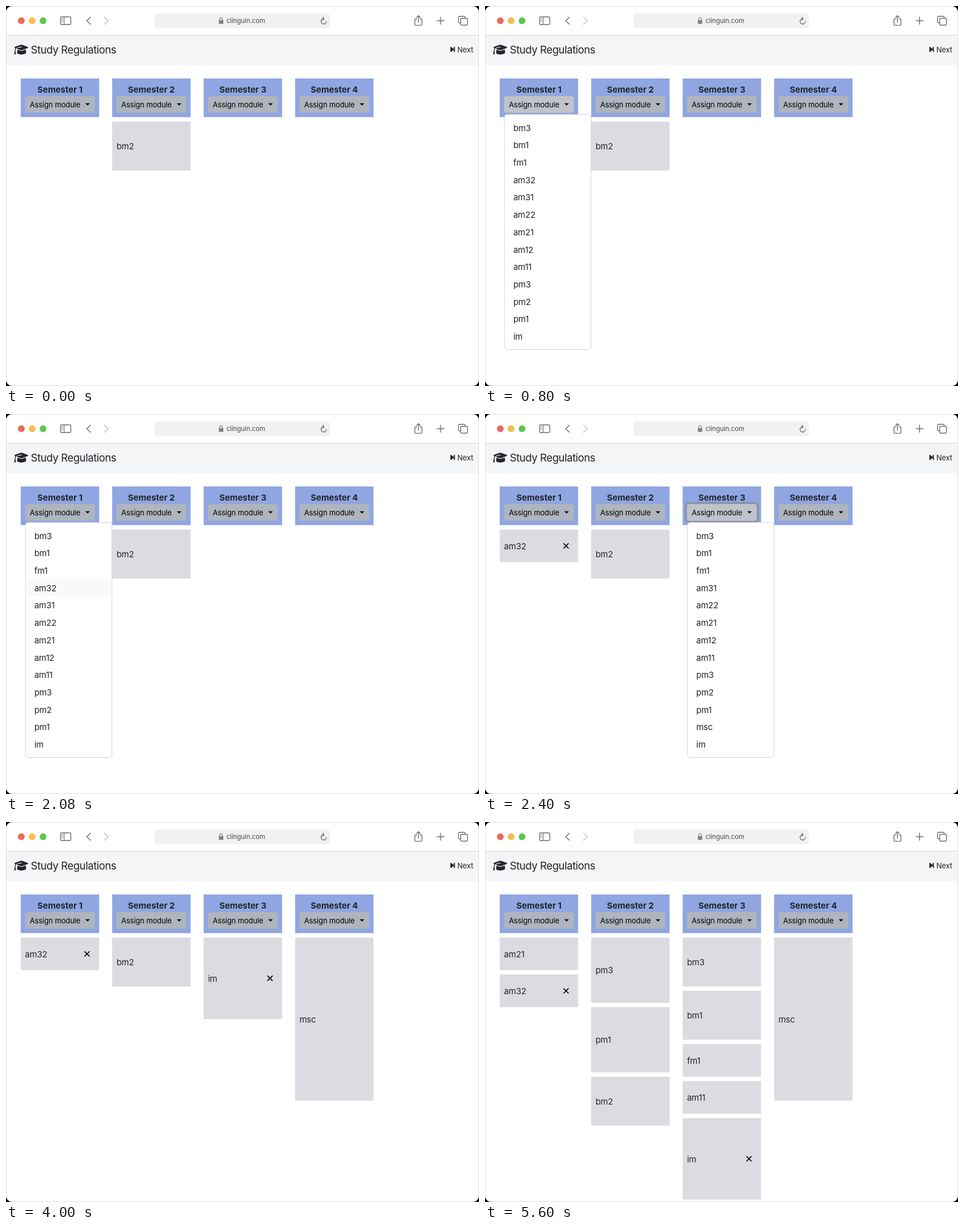
Recreate the animation shown at these times as an HTML page. Size 834 by 671 pixels, loop 6.4 s.

```html
<!DOCTYPE html>
<html lang="en">
<head>
<meta charset="utf-8">
<title>Study Regulations</title>
<style>
html, body { margin: 0; width: 100%; height: 100%; overflow: hidden; background: #000; }
svg { display: block; width: 834px; height: 671px; }
text { font: 14.9px Inter, "Liberation Sans", sans-serif; letter-spacing: -.01em; fill: #212529; white-space: pre; }
.brand { font-size: 18.6px; letter-spacing: -.025em; }
.head { font-weight: 700; text-anchor: middle; letter-spacing: 0; }
.small { font-size: 13px; fill: #000; }
.url { font-size: 11.6px; letter-spacing: -.01em; fill: #4a4a4a; }
.line { fill: none; stroke: #6b6b6b; stroke-width: 1.4; stroke-linecap: round; stroke-linejoin: round; }
</style>
</head>
<body>
<svg viewBox="0 0 834 671">
  <rect x=".5" y=".5" width="833" height="670" rx="10" fill="#fff" stroke="#dcdcdc"/>
  <circle cx="27" cy="26" r="6" fill="#ec6a5e"/>
  <circle cx="46" cy="26" r="6" fill="#f4be4f"/>
  <circle cx="65.3" cy="26" r="6" fill="#61c354"/>
  <g class="line">
    <rect x="96.2" y="19.2" width="18" height="13.6" rx="2"/>
    <path d="M102.5 19.5v13M98.3 22.3h2M98.3 24.8h2M98.3 27.3h2" stroke-width="1.1"/>
    <path d="M149 19.8L142.3 26l6.7 6.3"/>
    <path d="M173.7 19.8l6.7 6.2-6.7 6.3" stroke="#bdbdbd"/>
    <path d="M724.3 22.7h-1.6q-1.7 0-1.7 1.7v8q0 1.7 1.7 1.7h9q1.7 0 1.7-1.7v-8q0-1.7-1.7-1.7h-1.6M727.2 28.8V17.2M724 20.2l3.2-3.2 3.2 3.2"/>
    <path d="M760 26h12.4M766.2 19.8v12.4"/>
    <path d="M801.5 29.8h-1.6q-1.9 0-1.9-1.9v-7.8q0-1.9 1.9-1.9h7.8q1.9 0 1.9 1.9v1.5"/>
    <rect x="801.7" y="21.7" width="12" height="12" rx="2"/>
  </g>
  <rect x="262" y="13" width="309.5" height="26.3" rx="6" fill="#f1f1f1"/>
  <rect x="375.2" y="25" width="8" height="6.6" rx="1" fill="#808080"/>
  <path d="M376.8 25.5v-2q0-2.6 2.4-2.6t2.4 2.6v2" fill="none" stroke="#808080" stroke-width="1.2"/>
  <path class="line" d="M560.2 22.4a4.7 4.7 0 1 0 4.7 4.7M558.6 20.1l2.3 2.3-2.3 2.3" stroke-width="1.1"/>
  <text class="url" x="388.7" y="30.3">clinguin.com</text>
  <path fill="#f4f5f7" d="M1 52h832v52H1z"/>
  <path fill="#d9dadb" d="M1 51h832v1H1z"/>
  <g fill="#212529">
    <path d="M15 73.2Q15 72.5 16 72.1L26 68.5q1-.3 2 0l10 3.6q1 .4 1 1.1t-1 1.1l-10 3.6q-1 .3-2 0l-7-2.5q.8-1 2.3-1.3l6-1.2q.6-.2.5-.7-.2-.5-.7-.4l-6 1.2q-2.3.5-3.5 2.6-.9 1.6-.9 4.2l.7 5.1q0 .5-.6.5l-2.3-.6q-.4-.2-.2-.6 1.3-2.4 1-4.4 0-2.5 1-4.3L16 74.3q-1-.4-1-1.1z"/>
    <path d="M20.2 77.1l5.5 2q1.3.4 2.6 0l6.6-2.4.6 5.8q0 1.2-2.5 2.1-2.7 1.1-6 1.1t-6-1.1q-1.4-.6-1.3-1.7z"/>
  </g>
  <text class="brand" x="43.7" y="84">Study Regulations</text>
  <g id="view"></g>
</svg>
<script>
const view = document.getElementById('view');
const UNIT = 28.8, GAP = 7.68, ROW = 30.72;
const size = { am: 2, fm: 2, bm: 3, pm: 4, im: 5, msc: 10 };
const words = s => s.split(' ');
const list1 = words('bm3 bm1 fm1 am32 am31 am22 am21 am12 am11 pm3 pm2 pm1 im');
const list3 = words('bm3 bm1 fm1 am31 am22 am21 am12 am11 pm3 pm2 pm1 msc im');
const start = [[], ['bm2'], [], []];
const chosen = [['am32'], ['bm2'], ['im'], ['msc']];
const full = [['am21', 'am32'], ['pm3', 'pm1', 'bm2'], words('bm3 bm1 fm1 am11 im'), ['msc']];
const scenes = [
  { at: 0, plan: start },
  { at: 800, plan: start, menu: list1, col: 0, lit: true },
  { at: 1600, plan: start, menu: list1, col: 0, hover: 'am32' },
  { at: 2400, plan: [['am32'], ['bm2'], [], []], menu: list3, col: 2, lit: true, ring: true },
  { at: 4000, plan: chosen },
  { at: 4800, plan: chosen, next: true },
  { at: 5600, plan: full }
];

const left = i => 25.9 + i * 161.28;
const rect = (x, y, w, h, fill, more = '') =>
  `<rect x="${x}" y="${y}" width="${w}" height="${h}" fill="${fill}" ${more}/>`;
const text = (x, y, s, cls = '') => `<text class="${cls}" x="${x}" y="${y}">${s}</text>`;

function header(i, s) {
  const x = left(i), open = s.menu && s.col === i;
  return rect(x, 128, 138.3, 68.2, '#8fa6e2') +
    text(x + 69.2, 153, 'Semester ' + (i + 1), 'head') +
    (open && s.ring ? rect(x + 5.7, 157, 127, 33.6, 'none', 'rx="6" stroke="#8b95ad" stroke-width="4"') : '') +
    rect(x + 7.7, 159, 123, 29.6, open && s.lit ? '#bfc3ca' : '#afb5be', 'rx="4"') +
    text(x + 16, 178.5, 'Assign module', 'small') +
    `<path d="M${x + 114} 171.8h8l-4 4z"/>`;
}

function cells(i, names) {
  const x = left(i);
  let y = 204;
  return names.map(name => {
    const h = size[name.replace(/\d+/, '')] * UNIT, mid = y + h / 2;
    const cross = name === 'am32' || name === 'im'
      ? `<path d="M${x + 113} ${mid - 4}l8 8m0-8l-8 8" stroke="#111" stroke-width="1.8" stroke-linecap="round"/>` : '';
    const box = rect(x, y, 138.3, h, '#dbdce1') + text(x + 7.7, mid + 5.8, name) + cross;
    y += h + GAP;
    return box;
  }).join('');
}

function menu(s) {
  const x = left(s.col) + 8.3;
  return rect(x, 191.5, 152.6, 415, '#fff', 'rx="5.5" stroke="#cfd0d2"') +
    s.menu.map((name, i) => {
      const mid = 214.8 + i * ROW;
      return (name === s.hover ? rect(x + .5, mid - ROW / 2, 151.6, ROW, '#f8f9fa') : '') +
        text(x + 15.7, mid + 5.7, name);
    }).join('');
}

function nextButton(on) {
  const ink = on ? '#fff' : '#212529';
  return (on ? rect(776, 63, 56, 28, '#212529', 'rx="4"') : '') +
    `<g fill="${ink}"><path d="M783.5 73q0-1.5 1.3-.7l4.7 3.8v-3.2q0-1 1-1t1 1v7.6q0 1-1 1t-1-1v-3.2l-4.7 3.8q-1.3.8-1.3-.7z"/></g>` +
    `<text class="small" x="795.7" y="81.6" style="fill:${ink}">Next</text>`;
}

let shown;
function draw(now) {
  const t = now % 6400;
  const s = scenes.findLast(s => s.at <= t);
  if (s !== shown) {
    shown = s;
    view.innerHTML = s.plan.map((names, i) => header(i, s) + cells(i, names)).join('') +
      (s.menu ? menu(s) : '') + nextButton(s.next);
  }
}
const origin = performance.now();
function tick() {
  draw(performance.now() - origin);
  requestAnimationFrame(tick);
}
tick();
</script>
</body>
</html>
```
